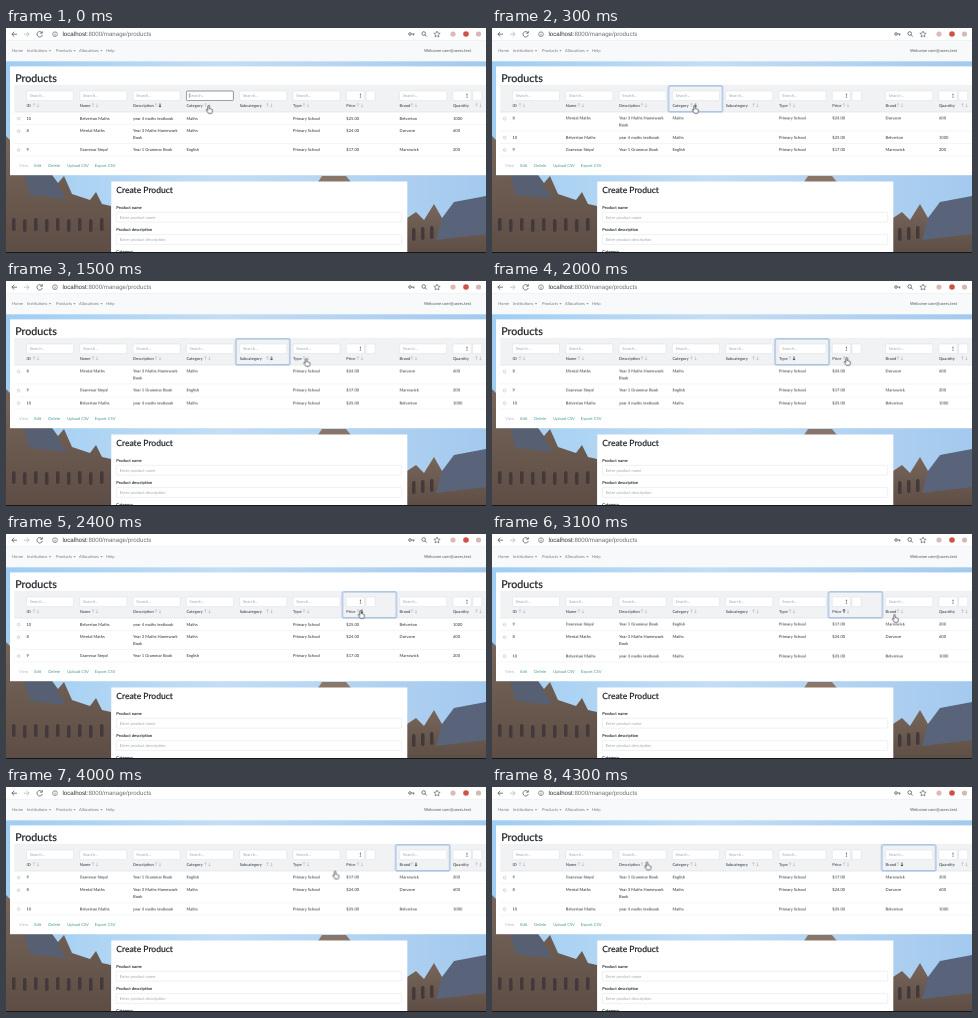
These frames come from a looping animation (480x225 px, 4400 ms). An HTML page:

```html
<!DOCTYPE html>
<html lang="en">
<head>
<meta charset="utf-8">
<title>Products</title>
<style>
html, body { margin: 0; width: 100%; height: 100%; overflow: hidden; background: #fff; }
svg { display: block; width: 100vw; height: 100vh; }
text { font: 4.1px Lato, sans-serif; fill: #2b3035; text-rendering: geometricPrecision; white-space: pre; }
.b { font-weight: 700; }
.title { font-weight: 500; fill: #212529; stroke: #212529; stroke-width: .18; }
.head { font-weight: 700; font-size: 4px; fill: #596068; }
.nav { fill: #7b7d80; }
.hint { fill: #a3a9af; }
.link { fill: #4a9a8e; }
.off { fill: #b4babf; }
.field { fill: #fff; stroke: #ced4da; stroke-width: .35; }
.rule { stroke: #dee2e6; stroke-width: .35; }
.arrow { fill: none; stroke: #a9adb3; stroke-width: .45; }
.dark { stroke: #33373b; stroke-width: .7; }
.icon { fill: none; stroke: #55595e; stroke-width: .8; }
.anim { animation: 4400ms step-end infinite; }
#r10 { animation-name: r10; }
#r8 { animation-name: r8; }
#r9 { animation-name: r9; }
#focus { animation-name: focus; }
#typed { animation-name: typed; }
#down { animation-name: down; }
#up { animation-name: up; }
#hand { animation-name: hand; }
@keyframes r10 {
  0% { transform: translateY(0); }
  6.81% { transform: translateY(18.9px); }
  20.45% { transform: translateY(31.5px); }
  52.27% { transform: translateY(0); }
  65.9%, 100% { transform: translateY(31.5px); }
}
@keyframes r8 {
  0% { transform: translateY(12.6px); }
  6.81% { transform: translateY(0); }
  52.27%, 100% { transform: translateY(12.6px); }
}
@keyframes r9 {
  0% { transform: translateY(31.5px); }
  20.45% { transform: translateY(18.9px); }
  52.27% { transform: translateY(31.5px); }
  65.9%, 100% { transform: translateY(0); }
}
@keyframes focus {
  0% { transform: translateX(176.5px); opacity: 0; }
  4.54% { transform: translateX(176.5px); opacity: 1; }
  20.45% { transform: translateX(229.8px); opacity: 1; }
  36.36% { transform: translateX(283.1px); opacity: 1; }
  52.27% { transform: translateX(336.4px); opacity: 1; }
  77.27%, 100% { transform: translateX(389.7px); opacity: 1; }
}
@keyframes typed {
  0% { opacity: 1; }
  4.54%, 100% { opacity: 0; }
}
@keyframes down {
  0% { transform: translateX(154px); opacity: 1; }
  4.54% { transform: translateX(203.5px); opacity: 1; }
  20.45% { transform: translateX(265.5px); opacity: 1; }
  36.36% { transform: translateX(302px); opacity: 1; }
  52.27% { transform: translateX(356px); opacity: 1; }
  65.9% { transform: translateX(356px); opacity: 0; }
  77.27%, 100% { transform: translateX(410px); opacity: 1; }
}
@keyframes up {
  0% { opacity: 0; }
  65.9% { opacity: 1; }
  77.27%, 100% { opacity: 0; }
}
@keyframes hand {
  0% { transform: translate(203.5px, 81.5px); }
  11.36% { transform: translate(210px, 81.5px); }
  13.63% { transform: translate(236px, 82px); }
  15.9% { transform: translate(260px, 82px); }
  18.18% { transform: translate(269px, 82px); }
  29.54% { transform: translate(270px, 81.8px); }
  34.09% { transform: translate(301px, 81.5px); }
  43.18% { transform: translate(331px, 81px); }
  45.45% { transform: translate(355.5px, 80.5px); }
  68.18% { transform: translate(378px, 82.5px); }
  70.45% { transform: translate(403.5px, 84.5px); }
  75% { transform: translate(409px, 82.5px); }
  79.54% { transform: translate(411px, 82.5px); }
  88.63% { transform: translate(394px, 84px); }
  90.9% { transform: translate(330px, 88px); }
  93.18% { transform: translate(240px, 86px); }
  95.45% { transform: translate(174px, 80px); }
  97.72%, 100% { transform: translate(156px, 79px); }
}
</style>
</head>
<body>
<svg id="stage" viewBox="0 0 480 225">
  <defs>
    <linearGradient id="sky">
      <stop offset="0" stop-color="#9fcdf2"/>
      <stop offset=".45" stop-color="#c3def5"/>
      <stop offset="1" stop-color="#a3c9ee"/>
    </linearGradient>
    <linearGradient id="stone" x2="0" y2="1">
      <stop offset="0" stop-color="#78665b"/>
      <stop offset="1" stop-color="#5d4d44"/>
    </linearGradient>
    <path id="pointer" d="M-1.9 1V-3.6Q-1.9-4.5-1.1-4.5T-.3-3.6V-.9Q.5-1.4 1-.6Q1.8-1 2.2-.2Q3.2-.4 3.3.7V2Q3.3 3.2 2.4 4.4H-1.2Q-2 2.8-3.5 1.4Q-4.1.4-3.2 0Q-2.5-.1-1.9 1Z"/>
  </defs>

  <!-- backdrop -->
  <rect width="480" height="225" fill="url(#sky)"/>
  <path fill="url(#stone)" d="M0 108L4 112V147H46L52 155L58 148L66 166L84 172L90 164L96 176L105 178V225H0Z"/>
  <path fill="#566072" d="M18 147H46L60 171L24 167Z"/>
  <path fill="#8a7668" d="M312 154L316 148H340L345 154Z"/>
  <path fill="url(#stone)" d="M401 190L410 184L418 192L428 176L436 190L480 184V225H401Z"/>
  <path fill="#59647a" d="M436 190L448 174L480 168V206L430 212Z"/>
  <g id="windows" fill="#43383a"></g>

  <!-- browser bar -->
  <rect width="480" height="13" fill="#fff"/>
  <g class="icon">
    <path d="M11 6.2H6M8.3 3.8L5.8 6.2L8.3 8.6"/>
    <path stroke="#b6b9bd" d="M18 6.2H23M20.7 3.8L23.2 6.2L20.7 8.6"/>
    <path d="M35.8 4.6A2.7 2.7 0 1 0 36.3 7M36.3 3.2V5.2H34.2"/>
    <circle cx="49" cy="6.2" r="2.4" stroke-width=".6"/>
    <path stroke-width=".7" d="M49 5.8V7.6M49 4.6V5.1"/>
    <circle cx="404" cy="6" r="1.3"/>
    <path d="M405.4 6H408.5M407.6 6V7.5"/>
    <circle cx="417.7" cy="5.5" r="1.8"/>
    <path d="M419 6.8L420.8 8.6"/>
    <path stroke-width=".6" d="M431 3L431.9 5.1L434.2 5.3L432.4 6.8L433 9L431 7.8L429 9L429.6 6.8L427.8 5.3L430.1 5.1Z"/>
  </g>
  <circle cx="447" cy="6" r="2.6" fill="#dfb9b5"/>
  <circle cx="460" cy="6" r="2.8" fill="#cf5248"/>
  <circle cx="472.5" cy="6" r="2.6" fill="#d5b9b6"/>
  <text x="56.5" y="8.3" style="font:6.15px 'Liberation Sans',Arial,sans-serif">localhost<tspan fill="#6a6e73">:8000/manage/products</tspan></text>

  <!-- navigation -->
  <rect y="12.5" width="480" height="20.8" fill="#f8f9fa"/>
  <path class="rule" d="M0 12.5H480"/>
  <g id="nav"></g>

  <!-- table card -->
  <rect x="4" y="38.4" width="476" height="108.8" fill="#fff"/>
  <text class="title" x="9.2" y="54.2" style="font-size:10.67px">Products</text>
  <rect x="8.2" y="57.3" width="471.8" height="26.7" fill="#f1f2f4"/>
  <path class="rule" d="M8.2 57.3H480M8.2 84H480"/>
  <g id="head"></g>
  <g id="rows"></g>
  <path class="rule" d="M8.2 128H480"/>
  <g id="links"></g>

  <rect id="focus" class="anim" y="57.9" width="54" height="26" rx=".8" fill="none" stroke="#86abdd" stroke-width="1"/>
  <g id="typed" class="anim">
    <rect x="180.4" y="63" width="47" height="9.6" rx="1" fill="none" stroke="#70767d" stroke-width=".7"/>
    <path d="M183.3 65.2V70" stroke="#333" stroke-width=".4"/>
  </g>
  <path id="down" class="anim arrow dark" d="M0 75.5V79M-1.1 77.9L0 79.1L1.1 77.9"/>
  <path id="up" class="anim arrow dark" d="M352 79V75.5M350.9 76.6L352 75.4L353.1 76.6"/>

  <!-- form card -->
  <rect x="105.3" y="153.5" width="296" height="72" fill="#fff"/>
  <text class="title" x="110.3" y="165.4" style="font-size:8.53px">Create Product</text>
  <g id="form"></g>
  <rect y="224" width="480" height="1" fill="#17181a"/>

  <g id="hand" class="anim"><use href="#pointer" transform="scale(.88)" fill="#fff" stroke="#2a2a2a" stroke-width=".75" stroke-linejoin="round"/></g>
</svg>
<script>
const put = (id, html) => { document.getElementById(id).innerHTML = html; };
const text = (x, y, s, cls = '') => `<text x="${x}" y="${y}" class="${cls}">${s}</text>`;
const field = (x, y, w, h = 9.6) => `<rect class="field" x="${x}" y="${y}" width="${w}" height="${h}" rx="1"/>`;
const colX = i => 20.5 + i * 53.3;

const menu = [[6, 'Home'], [21, 'Institutions', 42.8], [50, 'Products', 67.3], [73, 'Allocations', 94.3], [100, 'Help']];
put('nav', menu.map(([x, s, caret]) => text(x, 24.3, s, 'nav') +
  (caret ? `<path fill="#7b7d80" d="M${caret} 22.2h2.4l-1.2 1.3z"/>` : '')).join('') +
  text(418, 24.3, 'Welcome user@users.test', 'b nav'));

// label and the place of its first sort arrow
const cols = [['ID', 28], ['Name', 87], ['Description', 150], ['Category', 199.5], ['Subcategory', 261.5],
  ['Type', 298], ['Price', 352], ['Brand', 406], ['Quantity', 470.5]];
const arrows = x => `<path class="arrow" d="M${x} 79V75.5m-1.1 1.1l1.1-1.2l1.1 1.2M${x + 4} 75.5V79m-1.1-1.1l1.1 1.2l1.1-1.2"/>`;
const filter = (x, label) => label === 'Price' || label === 'Quantity'
  ? field(x, 63, 18.2) + field(x + 19.8, 63, 9) +
    `<path d="M${x + 13.2} 66.5l.9-1.1l.9 1.1zM${x + 13.2} 69l.9 1.1l.9-1.1zM${x + 13.9} 66h.4v3.4h-.4z" fill="#444"/>`
  : field(x, 63, 47) + text(x + 3.2, 69.2, 'Search...', 'hint');
put('head', cols.map(([label, ax], i) => filter(colX(i), label) +
  text(colX(i), 78.7, label, 'head') + arrows(ax)).join(''));

const items = [
  [10, 'Belverton Maths', 'year 4 maths textbook', 'Maths', '$25.00', 'Belverton', 1000],
  [8, 'Mental Maths', 'Year 3 Maths Homework|Book', 'Maths', '$24.00', 'Dorvane', 600],
  [9, 'Grammar Steps!', 'Year 1 Grammar Book', 'English', '$17.00', 'Marrowick', 200]
];
put('rows', items.map(([id, name, about, kind, price, brand, count]) => {
  const [first, rest] = about.split('|');
  const cells = [id, name, first, kind, '', 'Primary School', price, brand, count];
  return `<g id="r${id}" class="anim"><path class="rule" d="M8.2 84H480"/>` +
    '<circle cx="12.6" cy="90.6" r="1.3" fill="#fff" stroke="#a5a8ac" stroke-width=".5"/>' +
    cells.map((s, i) => text(colX(i), 91.7, s)).join('') +
    (rest ? text(colX(2), 98.1, rest) : '') + '</g>';
}).join(''));

const links = [[13, 'View', 'off'], [28.3, 'Edit'], [42.2, 'Delete'], [61.3, 'Upload CSV'], [88.8, 'Export CSV']];
put('links', links.map(([x, s, cls = 'link']) => text(x, 138.7, s, cls)).join(''));

put('form', ['name', 'description'].map((s, i) => {
  const y = 180.6 + i * 22.3;
  return text(110.3, y, 'Product ' + s, 'b') + field(110.3, y + 3.7, 285.4, 9.8) +
    text(113.8, y + 10.1, 'Enter product ' + s, 'hint');
}).join('') + text(110.3, 225, 'Category', 'b'));

const slots = [];
for (let i = 0; i < 9; i++) slots.push(`<rect x="${6 + i * 11}" y="${190 + i % 2}" width="3.5" height="13" rx="1.7"/>`);
for (let i = 0; i < 3; i++) slots.push(`<rect x="${406 + i * 9}" y="${200 - i}" width="3.5" height="13" rx="1.7"/>`);
put('windows', slots.join(''));
</script>
</body>
</html>
```
